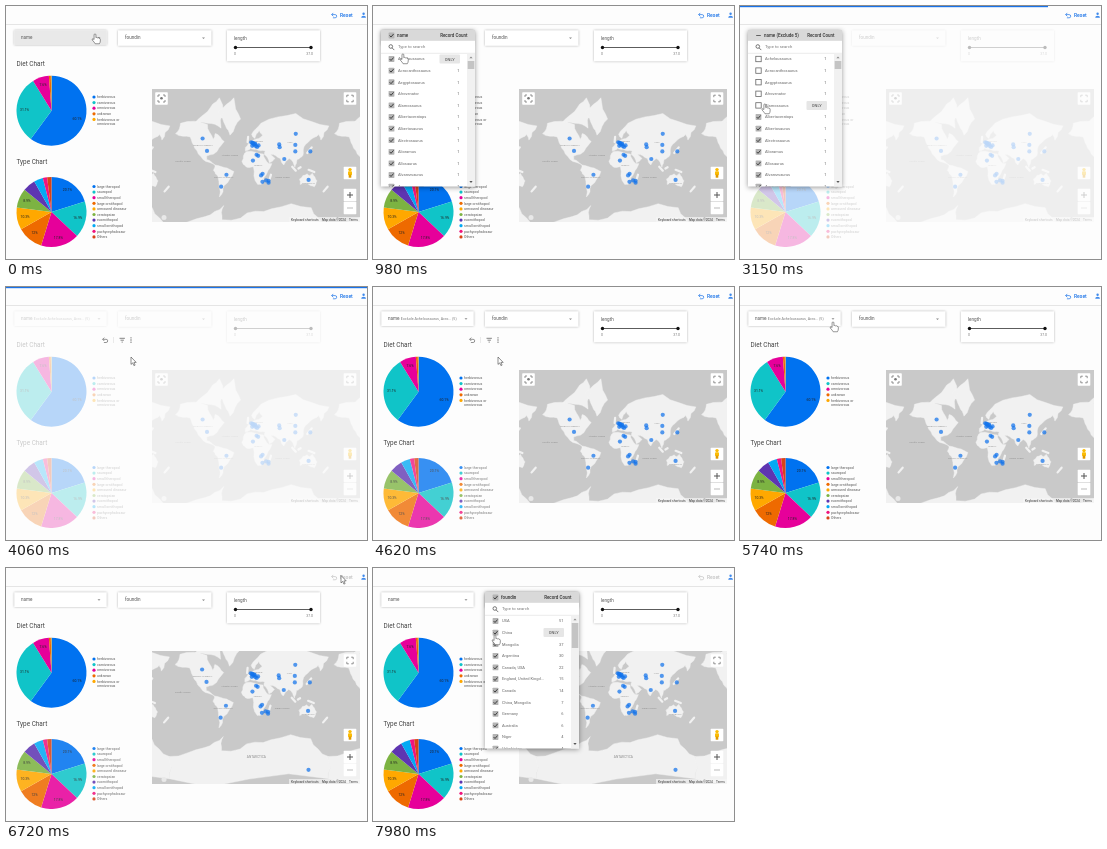
Animation, 361 px wide and 253 px high, one loop 8000 ms. Source, as an HTML page:

```html
<!DOCTYPE html>
<html lang="en">
<head>
<meta charset="utf-8">
<title>Dinosaur dashboard</title>
<style>
html, body { margin: 0; width: 100%; height: 100%; overflow: hidden; background: #fdfdfd; }
svg { display: block; width: 361px; height: 253px; font-family: Roboto, Arial, sans-serif; }
.card { filter: drop-shadow(0 .7px .8px rgba(0,0,0,.3)); }
.popup { filter: drop-shadow(0 1.5px 2.5px rgba(0,0,0,.4)); }
</style>
</head>
<body>
<svg id="stage" viewBox="0 0 361 253" xmlns="http://www.w3.org/2000/svg"></svg>
<script>
const LOOP = 8000, PAPER = '#fdfdfd';
const COLORS = ['#0072f0', '#10c4c8', '#e6009a', '#ee6a00', '#ffa800', '#7cb342', '#5e35b1', '#03a9f4', '#f0147d', '#d84315'];

const text = (x, y, size, str, fill = '#555', extra = '') =>
  `<text x="${x}" y="${y}" font-size="${size}" fill="${fill}" ${extra}>${str}</text>`;
const rect = (x, y, w, h, fill, extra = '') =>
  `<rect x="${x}" y="${y}" width="${w}" height="${h}" fill="${fill}" ${extra}/>`;
const circle = (x, y, r, fill, extra = '') => `<circle cx="${x}" cy="${y}" r="${r}" fill="${fill}" ${extra}/>`;
const line = (d, stroke, width = 0.8) => `<path d="${d}" fill="none" stroke="${stroke}" stroke-width="${width}"/>`;
const group = (id, body) => `<g id="${id}">${body}</g>`;
const MIDDLE = 'text-anchor="middle"', RIGHT = 'text-anchor="end"';

let seed = 7;
const jitter = () => (seed = seed * 16807 % 2147483647) / 2147483647 * 2 - 1;

// World map in Mercator projection
const RADIUS = 25.3, WORLD = 2 * Math.PI * RADIUS;
const project = (lon, lat) => [
  243.4 + lon * WORLD / 360,
  162.5 - RADIUS * Math.log(Math.tan(Math.PI / 4 + lat * Math.PI / 360))
];
const parse = str => str.split(' ').map(p => project(...p.split(',').map(Number)));

// Corner points only; roughen() turns the straight edges into coastline
const LANDS = {
  northAmerica: '-167,62 -156,71 -95,70 -82,55 -77,62 -57,52 -81,31 -97,27 -97,20 -78,8 -105,20 -124,42 -134,58',
  arctic: '-122,72 -95,78 -68,83 -64,67 -95,71',
  greenland: '-70,78 -35,83 -20,74 -44,60 -54,69',
  southAmerica: '-78,8 -50,1 -35,-7 -57,-36 -68,-54 -71,-18 -81,-5',
  africa: '-6,36 32,31 43,12 51,11 40,-10 30,-32 19,-34 9,4 -8,4 -17,16',
  eurasia: '-9,37 -9,43 10,54 30,60 22,65 12,56 5,61 26,71 105,77 180,69 162,54 157,61 138,54 122,39 121,28 108,20 103,3 97,17 90,22 78,8 70,22 48,30 58,22 45,13 34,30 36,37 15,40 3,42',
  australia: '114,-23 131,-12 137,-16 143,-11 153,-27 147,-38 131,-32 115,-34',
  antarctica: '-180,-78 -100,-73 -58,-64 -62,-75 -20,-74 50,-67 140,-66 180,-78 180,-85 -180,-85'
};
const ISLANDS = ['-4,51 -3,58', '131,33 141,43', '46,-23 49,-14', '97,4 105,-5', '111,0 116,3', '134,-3 147,-8', '168,-46 177,-38'];
const SITES = '-106,56 -96,37 -64,-38 -52,-14 105,61.5 104,36 104,47 138,36 79,21 8,17.6 134,-25 135,-82.9';
const CLUSTERS = [
  { x: 247, y: 137, dx: 6, dy: 4, count: 10 },
  { x: 258, y: 172, dx: 5, dy: 5, count: 6 },
  { x: 272, y: 140, dx: 2, dy: 2, count: 2 },
  { x: 250, y: 149, dx: 8, dy: 2, count: 2 }
];
const PLACES = { 'NORTH AMERICA': '-105,45', 'SOUTH AMERICA': '-58,-20', AFRICA: '20,5', EUROPE: '20,51', ASIA: '92,50',
  'Atlantic Ocean': '-44,27', 'Pacific Ocean': '-150,15', 'Indian Ocean': '75,-20', AUSTRALIA: '134,-34', ANTARCTICA: '17,-78.5' };

function roughen(points, passes = 2) {
  if (!passes) return points;
  const finer = points.flatMap(([x, y], i) => {
    const [nx, ny] = points[(i + 1) % points.length];
    const k = .12 * jitter();
    return [[x, y], [(x + nx) / 2 + k * (ny - y), (y + ny) / 2 - k * (nx - x)]];
  });
  return roughen(finer, passes - 1);
}
const outline = points => 'M' + points.map(p => p.map(v => v.toFixed(1))).join('L');

function worldMap() {
  const land = Object.values(LANDS).map(l => outline(roughen(parse(l))) + 'Z').join('');
  const islands = ISLANDS.map(l => outline(parse(l))).join('');
  const copies = [-1, 0, 1].map(k => `<g transform="translate(${k * WORLD})" stroke="#f1f1f1" stroke-linecap="round">`
    + `<path d="${land}" fill="#f1f1f1" stroke-width=".4"/><path d="${islands}" fill="none" stroke-width="2.2"/></g>`).join('');
  const names = Object.entries(PLACES).map(([name, at]) => {
    const [x, y] = parse(at)[0];
    return text(x, y, name === 'ANTARCTICA' ? 3.2 : 2.5, name, '#8c8c8c', MIDDLE);
  }).join('');
  const scattered = CLUSTERS.flatMap(c =>
    Array.from({ length: c.count }, () => [c.x + c.dx * jitter(), c.y + c.dy * jitter()]));
  const dots = [...parse(SITES), ...scattered].map(([x, y]) => circle(x, y, 2.1, '#1273eb', 'fill-opacity=".72"')).join('');
  const button = y => rect(337.7, y - 6.3, 12.6, 12.6, '#fff', 'rx=".7"');
  const ink = '#777';
  return `<clipPath id="frame">${rect(146, 83, 208, 133, '#000')}</clipPath><g clip-path="url(#frame)">`
    + rect(146, 83, 208, 133, '#c9c9c9') + group('world', copies + names + dots)
    + rect(283, 211, 71, 5, '#f5f5f5', 'fill-opacity=".7"')
    + text(285, 214.7, 3.2, 'Keyboard shortcuts', '#333') + text(316, 214.7, 3.2, 'Map data ©2024', '#333')
    + text(343, 214.7, 3.2, 'Terms', '#333') + circle(158, 211.5, 2.5, '#e8e8e8')
    + [92.5, 167, 189, 202].map(button).join('')
    + group('locate', rect(149.2, 86.2, 12.6, 12.6, '#fff', 'rx=".7"')
      + line('M152 91v-2h2m3 0h2v2m0 3v2h-2m-3 0h-2v-2', ink) + circle(155.5, 92.3, 1.3, ink))
    + line('M340.8 91.2v-2h2m2.4 0h2v2m0 2.6v2h-2m-2.4 0h-2v-2', ink)
    + circle(344, 163.6, 1.7, '#fbbc04') + rect(342, 165.3, 4, 4, '#fbbc04', 'rx="1"') + rect(342.7, 168.5, 2.6, 3.2, '#e09a00')
    + line('M341 189h6m-3-3v6', '#555', 1) + line('M341 202h6', '#bbb', 1) + '</g>';
}

function pie(cx, cy, r, shares, labelFrom) {
  const at = (share, k) => {
    const a = share * 2 * Math.PI;
    return [cx + r * k * Math.sin(a), cy - r * k * Math.cos(a)].map(v => +v.toFixed(2));
  };
  const total = shares.reduce((a, b) => a + b);
  let start = 0, slices = '', labels = '';
  shares.forEach((share, i) => {
    const end = start + share / total;
    slices += `<path d="M${cx} ${cy}L${at(start, 1)}A${r} ${r} 0 ${+(end - start > .5)} 1 ${at(end, 1)}Z" fill="${COLORS[i]}"/>`;
    if (share > labelFrom) {
      const [x, y] = at((start + end) / 2, .77);
      labels += text(x, y + 1.2, 3.4, share + '%', '#222', MIDDLE);
    }
    start = end;
  });
  return slices + labels;
}

const legend = (y, names) => names.map((name, i) =>
  circle(88, y + i * 5.6, 1.6, COLORS[i]) + text(91, y + 1.2 + i * 5.6, 3.5, name, '#555')).join('');

const arrowDown = (x, y) => `<path d="M${x - 1.5} ${y}h3l-1.5 1.6z" fill="#888"/>`;
const card = (x, w, h, body) => `<g><g class="card">${rect(x, 24.3, w, h, '#fff')}</g>${body}</g>`;

function checkbox(x, y, state) {
  if (state === 'off') return rect(x - 2.7, y - 2.7, 5.4, 5.4, '#fff', 'stroke="#666" stroke-width=".8"');
  if (state === 'some') return line(`M${x - 2.3} ${y}h4.6`, '#555', .9);
  return rect(x - 2.9, y - 2.9, 5.8, 5.8, '#b4b4b4', 'rx=".6"') + line(`M${x - 1.9} ${y}l1.4 1.5 2.6-3`, '#333', .9);
}

const ROW = 11.6, FIRST = 53;
function popup(id, x, title, rows, thumb) {
  const body = rows.map(([name, count], i) => {
    const y = FIRST + i * ROW;
    return group(`${id}-on${i}`, checkbox(x + 10.5, y, 'on')) + group(`${id}-off${i}`, checkbox(x + 10.5, y, 'off'))
      + text(x + 17, y + 1.4, 4, name, '#666') + text(x + 78.5, y + 1.4, 4, count, '#666', RIGHT);
  }).join('');
  return group(id, `<g class="popup">${rect(x, 24, 94, 156.5, '#fff')}</g>`
    + rect(x, 24, 94, 10.8, '#d9d9d9')
    + group(id + '-all', checkbox(x + 10.5, 29.5, 'on')) + group(id + '-some', checkbox(x + 10.5, 29.5, 'some'))
    + text(x + 16, 31.1, 4.5, title, '#333', `font-weight="500" id="${id}-title"`)
    + text(x + 86.5, 31.1, 4.5, 'Record Count', '#333', `font-weight="500" ${RIGHT}`)
    + circle(x + 9.8, 40.5, 1.8, 'none', 'stroke="#555" stroke-width=".8"') + line(`M${x + 11.1} 41.9l2.2 2.2`, '#555')
    + text(x + 17, 42.4, 4.2, 'Type to search', '#777') + line(`M${x} 47.3h94`, '#ddd', .6)
    + `<clipPath id="${id}-clip">${rect(x, 47.5, 94, 133, '#000')}</clipPath><g clip-path="url(#${id}-clip)">${body}`
    + group(id + '-only', rect(x + 58.5, -4.5, 20.5, 9, '#e6e6e6', 'rx="1"') + text(x + 68.7, 1.5, 4, 'ONLY', '#444', MIDDLE)) + '</g>'
    + rect(x + 86, 47.5, 8, 133, '#f1f1f1') + rect(x + 86.7, 55, 6.6, thumb, '#c4c4c4')
    + `<path d="M${x + 88.4} 52.3h3.2l-1.6-1.9z" fill="#888"/><path d="M${x + 88.4} 175h3.2l-1.6 1.9z" fill="#555"/>`);
}

const GENERA = ['Achelousaurus', 'Acrocanthosaurus', 'Aegyptosaurus', 'Afrovenator', 'Alamosaurus', 'Albertaceratops',
  'Albertosaurus', 'Alectrosaurus', 'Alioramus', 'Allosaurus', 'Alvarezsaurus', 'Amargasaurus'].map(n => [n, 1]);
const COUNTRIES = [['USA', 51], ['China', 47], ['Mongolia', 37], ['Argentina', 30], ['Canada, USA', 22],
  ['England, United Kingd...', 15], ['Canada', 14], ['China, Mongolia', 7], ['Germany', 6], ['Australia', 6], ['Niger', 4], ['Uzbekistan', 4]];

const undo = (x, y, fill) => line(`M${x - 1.2} ${y - 2.4}l-1.7 1.7 1.7 1.7M${x - 2.8} ${y - .7}h3.4a1.6 1.6 0 0 1 0 3.2h-2.2`, fill, .7);
const resetButton = fill => undo(328.5, 9.3, fill) + text(334, 11.2, 5, 'Reset', fill, 'font-weight="500"');

document.getElementById('stage').innerHTML =
  rect(0, 0, 361, 253, PAPER)
  + group('resetOn', resetButton('#1a73e8')) + group('resetOff', resetButton('#c2c2c2'))
  + circle(357.6, 7.7, 1.2, '#3f8aec') + '<path d="M355.2 11.8q0-2 2.4-2t2.4 2z" fill="#3f8aec"/>'
  + line('M0 18.5h361', '#e0e0e0', .8)
  + group('page',
    card(8.3, 92.4, 14.7, group('nameHover', rect(8.3, 24.3, 92.4, 14.7, '#e9e9e9'))
      + text(15, 33, 4.6, 'name', '#555')
      + group('nameSet', text(26, 33, 3.7, ': Exclude Achelousaurus, Acro... (5)', '#777'))
      + arrowDown(93, 31.2))
    + card(112, 93.5, 15.5, text(119, 33.2, 4.6, 'foundin', '#555') + arrowDown(197.5, 31.4))
    + card(221, 93, 31, text(228, 34.2, 4.6, 'length', '#555') + line('M229 41.5h76', '#333')
      + circle(229.5, 41.5, 1.7, '#111') + circle(305, 41.5, 1.7, '#111')
      + text(228, 49, 3.5, '0', '#777') + text(307, 49, 3.5, '37.0', '#777', RIGHT))
    + text(10.5, 59.8, 6.4, 'Diet Chart', '#444') + text(10.5, 158, 6.4, 'Type Chart', '#444')
    + group('diet', pie(45.5, 104.7, 35, [60.1, 31.1, 7.6, .9, .3], 5)
      + legend(91, ['herbivorous', 'carnivorous', 'omnivorous', 'unknown', 'herbivorous or'])
      + text(91, 118.5, 3.5, 'omnivorous', '#555'))
    + group('type', pie(45.5, 206, 35, [20.1, 16.9, 17.8, 12, 10.3, 8.9, 5.8, 4.2, 2, 2], 7)
      + legend(180.5, ['large theropod', 'sauropod', 'small theropod', 'large ornithopod', 'armoured dinosaur',
        'ceratopsian', 'euornithopod', 'small ornithopod', 'pachycephalosaur', 'Others']))
    + group('map', worldMap()))
  + group('tools', undo(99.5, 53, '#666') + line('M107.5 50v6', '#ddd', .6)
    + line('M113.5 51.3h5.4m-4.4 1.9h3.4m-2.3 1.9h1.2', '#666', .8)
    + [50.8, 53, 55.2].map(y => circle(125, y, .65, '#666')).join(''))
  + popup('genus', 8, 'name', GENERA, 8) + popup('place', 112, 'foundin', COUNTRIES, 25)
  + rect(0, 0, 0, 1.2, '#1a73e8', 'id="bar"')
  + group('hand', '<path transform="scale(.92)" d="M-1 .9Q-1 0 0 0T1 .9V4Q2 3.2 2.8 4.2 3.8 3.6 4.4 4.7 5.8 4.4 5.8 5.8V7.6Q5.8 9 4.8 10.6H.2Q-.6 9-2.9 6.6-3.6 5.2-2.2 5.1L-1 6Z" fill="#fff" stroke="#444" stroke-width=".6" stroke-linejoin="round"/>')
  + group('pointer', '<path d="M0 0V7.4L1.7 5.9 2.9 8.6 4.1 8.1 2.9 5.4H5.2Z" fill="#fff" stroke="#444" stroke-width=".6" stroke-linejoin="round"/>');

const $ = Object.fromEntries([...document.querySelectorAll('[id]')].map(el => [el.id, el]));
const show = (id, on) => $[id].setAttribute('display', on ? 'inline' : 'none');
const between = (t, a, b) => t >= a && t < b;
const clamp = k => Math.min(1, Math.max(0, k));
const smooth = k => k * k * (3 - 2 * k);

// Five rows are unticked at a steady pace, the cursor stepping down after each click
const CLICK = 1600, PACE = 350, LAST = 4;
const excludedAt = t => Math.min(LAST + 1, Math.max(0, Math.floor((t - CLICK) / PACE) + 1));
function rowAt(t) {
  const beat = Math.max(0, (t - CLICK - 80) / PACE);
  return Math.min(LAST, Math.floor(beat) + smooth(clamp(beat % 1 * PACE / 135)) * (t > CLICK + 80));
}

const STOPS = [
  { from: 0, to: 500, x: 89, y: 28 },
  { from: 1150, to: 3400, x: 18, y: 52 },
  { from: 4000, to: 5040, x: 125, y: 70 },
  { from: 5320, to: 5750, x: 93, y: 35 },
  { from: 6130, to: 6800, x: 335, y: 7.5 },
  { from: 7300, to: 7560, x: 165, y: 29 },
  { from: 7910, to: LOOP, x: 122, y: 67 }
];
function cursorAt(t) {
  const i = STOPS.findLastIndex(s => s.from <= t);
  const a = STOPS[i], b = STOPS[i + 1] || a;
  const k = smooth(clamp((t - a.to) / (b.from - a.to || 1)));
  const down = i === 1 ? rowAt(t) * (1 - k) : 0;
  return [a.x + (b.x - a.x) * k + down * 1.7, a.y + (b.y - a.y) * k + down * 11.5];
}

// Charts dim while filtering, then fade back at their own pace after each reload
const DIM = .27, FILTERED = 1750, RELOADED = 4200, RESET = 6230;
function opacityAt(t, duration) {
  if (t < FILTERED) return 1;
  const start = t < RESET ? RELOADED : RESET;
  return DIM + (1 - DIM) * clamp((t - start) / duration);
}
const FADE_IN = { diet: 250, map: 300, type: 600 };

function render(t) {
  const [x, y] = cursorAt(t);
  const isArrow = between(t, 3480, 5250) || between(t, 5830, 7200);
  for (const id of ['hand', 'pointer']) $[id].setAttribute('transform', `translate(${x} ${y})`);
  show('hand', !isArrow);
  show('pointer', isArrow);

  const excluded = excludedAt(t), reset = t >= RESET;
  show('genus', between(t, 350, 3650));
  show('place', t >= 7560);
  $['genus-title'].textContent = excluded ? `name (Exclude ${excluded})` : 'name';
  show('genus-all', !excluded);
  show('genus-some', excluded);
  show('place-some', false);
  GENERA.forEach((_, i) => {
    show(`genus-on${i}`, i >= excluded);
    show(`genus-off${i}`, i < excluded);
    show(`place-off${i}`, false);
  });
  const row = Math.round((y + 1.5 - FIRST) / ROW);
  for (const id of ['genus', 'place']) {
    show(`${id}-only`, row >= 0);
    $[`${id}-only`].setAttribute('transform', `translate(0 ${FIRST + row * ROW})`);
  }

  show('nameSet', excluded > LAST && !reset);
  show('nameHover', t < 500);
  show('resetOn', !reset);
  show('resetOff', reset);
  show('locate', !reset);
  show('tools', between(t, 3800, 5180));
  $.world.setAttribute('transform', reset ? 'translate(-.5 -31)' : '');

  for (const el of $.page.children) {
    const duration = FADE_IN[el.id];
    el.setAttribute('opacity', duration ? opacityAt(t, duration) : reset ? 1 : opacityAt(t, FADE_IN.map));
  }
  show('bar', between(t, 1820, 4350));
  $.bar.setAttribute('width', 361 * clamp((t - 1820) / 1560));
}

function tick() {
  render(performance.now() % LOOP);
  requestAnimationFrame(tick);
}
tick();
</script>
</body>
</html>
```
